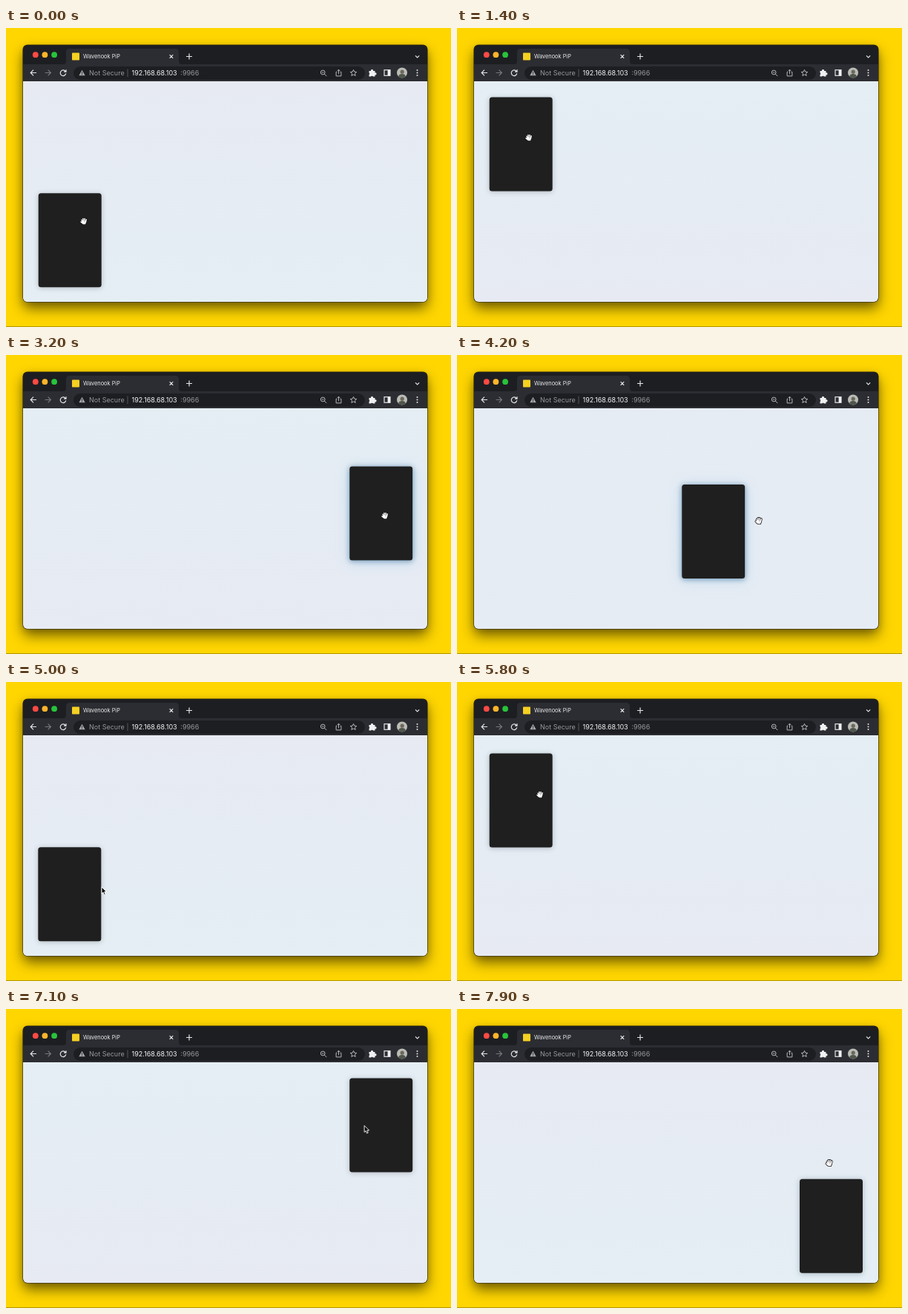
An HTML page that plays this animation: 600 by 404 pixels, repeating every 8000 ms.

```html
<!DOCTYPE html>
<html lang="en">
<head>
<meta charset="utf-8">
<title>Draggable picture in picture</title>
<style>
  html, body { margin: 0; width: 100%; height: 100%; overflow: hidden; }
  body { position: relative; background: #ffd600; }
  body::after {
    content: ""; position: absolute; left: 0; right: 0; top: 403px; height: 1px;
    background: rgba(0, 0, 0, .3);
  }
  .window {
    position: absolute; left: 23px; top: 23px; width: 545px; height: 347px;
    border-radius: 6px; background: #1d1e22;
    box-shadow: 0 0 0 .6px rgba(0, 0, 0, .75), 0 9px 18px rgba(0, 0, 0, .55), 0 2px 8px rgba(0, 0, 0, .12);
  }
  .page {
    position: absolute; left: 23px; top: 72px; width: 545px; height: 298px;
    overflow: hidden; border-radius: 0 0 6px 6px;
    background: linear-gradient(#e4eef4, #e7eaf3);
  }
  .tint { position: absolute; inset: 0; background: linear-gradient(#e7eaf3, #e4eef4); }
  .card {
    position: absolute; left: -23px; top: -72px; width: 84.5px; height: 126.5px;
    border-radius: 3.5px; background: #1f1f1f;
    box-shadow: 0 1px 7px rgba(60, 66, 72, .3);
  }
  .glow {
    position: absolute; inset: 0; border-radius: inherit;
    box-shadow: 0 1px 6px rgba(70, 135, 190, .4), 0 2px 18px rgba(105, 180, 230, .35);
  }
  svg { position: absolute; left: 0; top: 0; }
  text { font-family: Inter, "Liberation Sans", sans-serif; }
  .icon { fill: none; stroke: #e3e4e6; stroke-width: 1.2; }
  .soft { stroke: #b4b6ba; stroke-width: 1; }
</style>
</head>
<body>
<div class="window"></div>
<div class="page">
  <div class="tint" id="tint"></div>
  <div class="card" id="card"><div class="glow" id="glow"></div></div>
</div>
<svg width="600" height="404" viewBox="0 0 600 404">
  <!-- tab strip -->
  <path d="M23 49H568V72H23ZM77 49q4 0 4-4V33q0-5 5-5H228q5 0 5 5V45q0 4 4 4Z" fill="#2c2d32"/>
  <circle cx="39.8" cy="36.2" r="3.9" fill="#ff4a45"/>
  <circle cx="52.4" cy="36.2" r="3.9" fill="#ffb52a"/>
  <circle cx="65.1" cy="36.2" r="3.9" fill="#28c33b"/>
  <rect x="89" y="33.5" width="10" height="10" rx=".8" fill="#f6d022"/>
  <text x="104" y="41" font-size="7.4" fill="#e8e9eb">Wavenook PiP</text>
  <path class="icon" d="M220.6 36.2l4.6 4.6m0-4.6l-4.6 4.6M243 38.5h8m-4-4v8M552 37.3l2.6 2.6 2.6-2.6"/>
  <!-- toolbar -->
  <rect x="91" y="52" width="393" height="18" rx="9" fill="#1d1e22"/>
  <path class="icon" d="M41 60.5H33.2m3.8-3.8l-3.8 3.8 3.8 3.8"/>
  <path class="icon" style="stroke:#77797d" d="M52.6 60.5H60.4m-3.8-3.8l3.8 3.8-3.8 3.8"/>
  <path class="icon" d="M80.2 58.6A3.8 3.8 0 1 0 80.8 61.4M81 56.3v2.9h-2.9"/>
  <path d="M102.5 56.8l4.2 7.4h-8.4Z" fill="#a3a5a9"/>
  <path d="M102.5 59.4v2.2m0 .7v1" stroke="#1d1e22" stroke-width=".9"/>
  <text x="112" y="64" font-size="9" fill="#96989c">Not Secure</text>
  <path d="M164 55.5v10.5" stroke="#55575b"/>
  <text x="169.5" y="64" font-size="9" fill="#f3f4f5">192.168.68.103</text>
  <text x="235.3" y="64" font-size="9" fill="#96989c">:9966</text>
  <g class="icon soft">
    <circle cx="427.2" cy="60" r="2.9"/>
    <path d="M429.3 62.1l3 3M425.9 60h2.6"/>
    <path d="M446.4 59.3h-1.3v5.6h6.8v-5.6h-1.3M448.5 62.3v-6m-1.8 1.7l1.8-1.8 1.8 1.8"/>
    <path d="M468.5 56.4l1.25 2.8 3 .3-2.25 2 .65 3-2.65-1.6-2.65 1.6.65-3-2.25-2 3-.3Z"/>
  </g>
  <path d="M489.5 58h2.6a1.5 1.5 0 1 1 2.8 0h2.6v2.4a1.5 1.5 0 1 1 0 2.8v2.4h-2.6a1.5 1.5 0 0 0-2.8 0h-2.6v-2.6a1.5 1.5 0 0 0 0-2.6Z" fill="#f0f1f2"/>
  <rect class="icon" x="510" y="56.7" width="8" height="7.6"/>
  <path d="M514.6 56.7h3.4v7.6h-3.4Z" fill="#f0f1f2"/>
  <circle cx="534" cy="60.5" r="7" fill="#b9bdb5"/>
  <path d="M529 65.4q1-3.4 5-3.4t5 3.4a7 7 0 0 1-10 0Z" fill="#50564c"/>
  <circle cx="534.2" cy="59.2" r="2.6" fill="#6d675c"/>
  <g fill="#e3e4e6">
    <circle cx="554.5" cy="57" r="1"/><circle cx="554.5" cy="60.5" r="1"/><circle cx="554.5" cy="64" r="1"/>
  </g>
  <!-- pointers -->
  <defs>
    <path id="fingers" d="M-2.9-1.7L-1.7 1.6M-1.1-3.5L-.6 1.2M1.1-3.5L1 1.2M3.2-2.2L2.4 1.6M-4 .9L-1.6 3M-1.4 2.2H1.9L1.6 3.6H-.7Z"/>
  </defs>
  <g id="hand" fill="none" stroke-linecap="round" stroke-linejoin="round">
    <use href="#fingers" stroke="#111" stroke-width="3"/>
    <use href="#fingers" stroke="#fff" stroke-width="1.5"/>
  </g>
  <path id="arrow" d="M0 0V8.9L2 7.1 3.4 10.4 5.1 9.7 3.7 6.5H6.5Z" fill="#080808" stroke="#fff" stroke-width=".9" stroke-linejoin="round"/>
</svg>
<script>
const LOOP = 8000, STEP = 100;
const LEFT = 43.7, RIGHT = 463.2, TOP = 93.4, BOTTOM = 223.2;

const ease = {
  hold: () => 0,
  line: u => u,
  pull: u => u * u,
  glide: u => 1 - (1 - u) ** 2,
  fling: u => 1 - (1 - u) ** 3,
  spring: u => 1 + 1.9 * (u - 1) ** 3 + .9 * (u - 1) ** 2,
  both: u => u * u * (3 - 2 * u)
};

// Each key: time, x, y, easing towards the next key
const cardKeys = [
  [0, LEFT, BOTTOM, "hold"],
  [400, LEFT, BOTTOM, "pull"],
  [700, 40, 175, "fling"],
  [1200, LEFT, TOP, "hold"],
  [1900, LEFT, TOP, "pull"],
  [2200, 150, 140, "spring"],
  [2700, RIGHT, BOTTOM, "hold"],
  [2900, RIGHT, BOTTOM, "pull"],
  [3200, RIGHT, 150.5, "fling"],
  [3500, RIGHT, TOP, "hold"],
  [3900, RIGHT, TOP, "pull"],
  [4100, 359, 158, "line"],
  [4200, 303.2, 175, "glide"],
  [5000, 43.3, BOTTOM, "hold"],
  [5400, LEFT, BOTTOM, "pull"],
  [5600, LEFT, 180, "fling"],
  [5900, LEFT, TOP, "hold"],
  [6300, LEFT, TOP, "pull"],
  [6500, 92.7, TOP, "spring"],
  [7000, RIGHT, TOP, "hold"],
  [7400, RIGHT, TOP, "pull"],
  [7700, 457, 143, "line"],
  [7800, 459.5, 195, "line"],
  [7900, 462, 229.8, "hold"]
];

const pointerKeys = [
  [0, 105, 261, "hold"],
  [400, 105, 261, "pull"],
  [700, 101, 212, "fling"],
  [1000, 97, 148, "hold"],
  [1900, 97, 148, "pull"],
  [2200, 203, 195, "both"],
  [2800, 511, 290, "hold"],
  [2900, 511, 290, "pull"],
  [3200, 511, 217, "fling"],
  [3500, 511, 160, "hold"],
  [3900, 511, 160, "pull"],
  [4100, 407, 224, "hold"],
  [4400, 407, 224, "both"],
  [5000, 129, 277, "both"],
  [5400, 112, 270, "pull"],
  [5600, 112, 227, "fling"],
  [5900, 112, 149, "hold"],
  [6300, 112, 149, "pull"],
  [6500, 161, 149, "both"],
  [7200, 502, 158, "hold"],
  [7400, 502, 158, "pull"],
  [7700, 502, 208, "hold"]
];

const arrowSpans = [[2400, 2700], [4400, 5300], [6400, 7200]];
const el = id => document.getElementById(id);
const clamp = v => Math.min(1, Math.max(0, v));

function at(keys, t) {
  let i = keys.length - 1;
  while (keys[i][0] > t) i--;
  const [t0, x, y, kind] = keys[i];
  const next = keys[i + 1];
  if (!next) return [x, y];
  const u = ease[kind]((t - t0) / (next[0] - t0));
  return [x + (next[1] - x) * u, y + (next[2] - y) * u];
}

function draw(now) {
  const t = Math.floor((now % LOOP) / STEP) * STEP;
  const [x, y] = at(cardKeys, t);
  const [px, py] = at(pointerKeys, t);
  const away = Math.hypot(
    Math.min(Math.abs(x - LEFT), Math.abs(x - RIGHT)),
    Math.min(Math.abs(y - TOP), Math.abs(y - BOTTOM)));

  el("card").style.transform = `translate(${x}px, ${y}px)`;
  el("glow").style.opacity = clamp(away / 50);
  el("tint").style.opacity = ease.both(clamp(((y - TOP) / (BOTTOM - TOP) - .3) / .7));

  const isArrow = arrowSpans.some(([a, b]) => t >= a && t < b);
  const shown = el(isArrow ? "arrow" : "hand");
  el("arrow").style.display = isArrow ? "" : "none";
  el("hand").style.display = isArrow ? "none" : "";
  shown.setAttribute("transform", `translate(${px} ${py})`);
  requestAnimationFrame(draw);
}

const start = performance.now();
draw(0);
function tick(now) { draw(Math.max(0, now - start)); }
</script>
</body>
</html>
```
